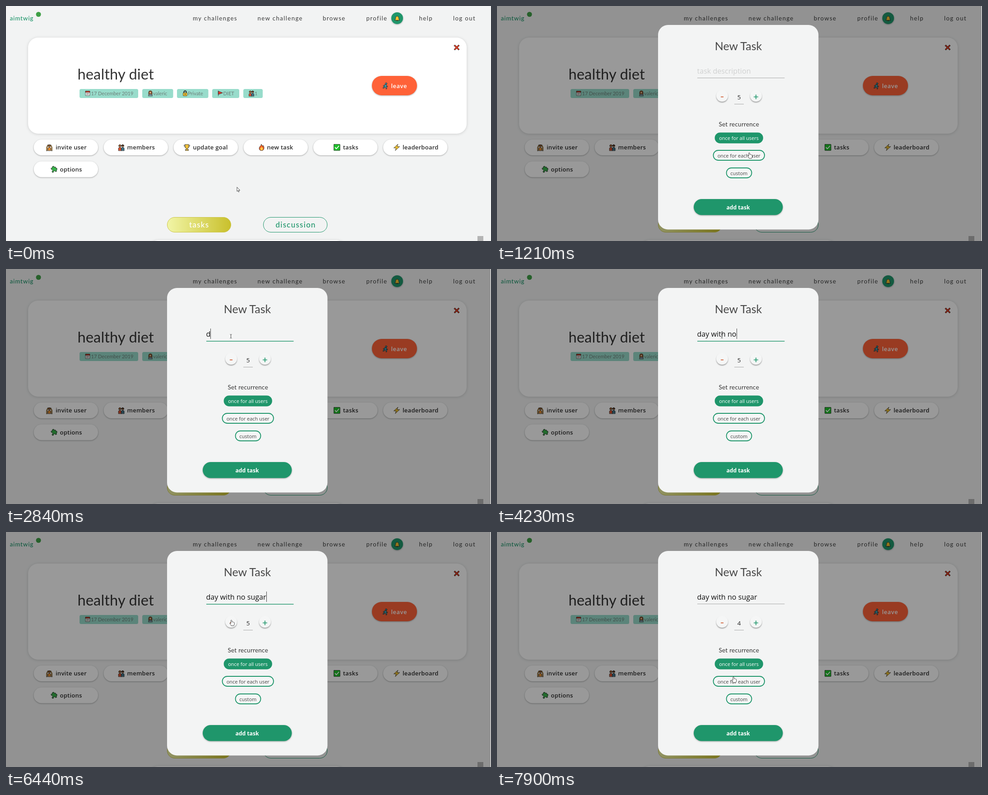
An HTML page that plays this animation: 1075 px wide and 521 px high, repeating every 8000 ms.

```html
<!DOCTYPE html>
<html lang="en">
<head>
<meta charset="utf-8">
<title>New task</title>
<style>
  html, body { margin: 0; width: 100%; height: 100%; overflow: hidden; background: #f2f3f3; }
  svg { display: block; width: 1075px; height: 521px; }
  text { white-space: pre; }
  .round { font-family: Lato, "Open Sans", sans-serif; }
  .plain { font-family: "Open Sans", "Noto Sans", sans-serif; }
  .nav { font-size: 13.3px; letter-spacing: 1.35px; fill: #3c3c3c; }
  .badge { font-size: 11px; fill: #6c7f79; }
  .menu { font-size: 13px; letter-spacing: .25px; font-weight: 600; fill: #2b2b2b; }
  .tab { font-size: 17px; letter-spacing: 1.25px; font-weight: 500; }
  .pill { font-size: 11px; fill: #444; }
  .input { font-size: 16.1px; fill: #111; }
  .low { filter: drop-shadow(0 1.5px 1.5px rgba(0,0,0,.32)); }
  .knob { filter: drop-shadow(0 2px 1px rgba(0,0,0,.34)); }
  .wide { filter: drop-shadow(0 1px 3px rgba(0,0,0,.15)); }
  .ink { stroke: #222; stroke-width: .8; stroke-linejoin: round; stroke-linecap: round; }
</style>
</head>
<body>
<svg id="stage" viewBox="0 0 1075 521" xmlns="http://www.w3.org/2000/svg"></svg>
<script>
const GREEN = '#1f966b';
const stage = document.getElementById('stage');

const text = (x, y, cls, str, extra = '') =>
  `<text x="${x}" y="${y}" class="${cls}" ${extra}>${str}</text>`;
const rect = (x, y, w, h, r, fill, extra = '') =>
  `<rect x="${x}" y="${y}" width="${w}" height="${h}" rx="${r}" fill="${fill}" ${extra}/>`;
const circle = (x, y, r, fill, extra = '') =>
  `<circle cx="${x}" cy="${y}" r="${r}" fill="${fill}" ${extra}/>`;
const path = (d, fill, extra = '') => `<path d="${d}" fill="${fill}" ${extra}/>`;
const group = (id, body) => `<g id="${id}">${body}</g>`;

const person = (x, hair, shirt) =>
  path(`M${x - 3.3} 7V1.5Q${x} -2 ${x + 3.3} 1.5V7Z`, shirt) +
  circle(x, -3.5, 2.6, '#e0a070') +
  path(`M${x - 2.6} -3.5a2.6 2.6 0 0 1 5.2 0Z`, hair);

// Every icon is drawn around its own centre, about 14 px across.
const icons = {
  calendar: rect(-5.5, -5.5, 11, 11.5, .5, '#fff') + rect(-5.5, -5.5, 11, 3.2, .5, '#d9432f') +
    text(0, 4.2, 'plain', '31', 'font-size="6.5" font-weight="700" text-anchor="middle" fill="#333" stroke="none"'),
  woman: path('M-4.5 3V-2a4.5 4.5 0 0 1 9 0V3Z', '#a5622f') + circle(0, -1.5, 2.7, '#f0b987') +
    path('M-5 6.5Q-5 2 0 2T5 6.5Z', '#7f9aa8'),
  lock: path('M-3 -1V-3a3 3 0 0 1 6 0V-1', 'none', 'stroke-width="2"') + rect(-5, -1.5, 10, 8, 1, '#f2c230') +
    path('M0 1.5V3.5', 'none', 'stroke-width="1.6"'),
  flag: path('M-5 -5.5L6 -1L-5 3Z', '#e23a2c') + path('M-5 -6V6.5', 'none'),
  couple: person(-3, '#c8702f', '#d8512f') + person(3.2, '#5b3a22', '#3d7286'),
  cheer: person(0, '#a3602c', '#df8b32') +
    path('M-5.5 7V0L-3 -5M5.5 7V0L3 -5', 'none', 'style="stroke-width:2.4"') +
    path('M-5.5 6.5V0L-3 -4.5M5.5 6.5V0L3 -4.5', 'none', 'style="stroke:#e2a13c;stroke-width:1.2"'),
  runner: circle(1.6, -5, 1.9, '#39a5b8') +
    path('M-1.8 -2.6L2 -2.8L2.6 0L5 .8L4.6 2L1.6 1.4L3.4 4.2L2.6 7H1L1.4 4.6L-1 2.4L-2.2 4.8L-5.5 5.4L-5.6 4L-3.4 3.2L-1.6 -.8L-3.4 1.4L-4.8 .6Z', '#39a5b8'),
  bell: path('M-5 4Q-3.6 2.5 -3.6 -.5Q-3.6 -4.6 0 -5Q3.6 -4.6 3.6 -.5Q3.6 2.5 5 4Z', '#f5c432') +
    path('M-1.3 4.5a1.3 1.3 0 0 0 2.6 0Z', '#d89a20'),
  cross: path('M-6 -4L-4 -6L0 -2L4 -6L6 -4L2 0L6 4L4 6L0 2L-4 6L-6 4L-2 0Z', '#e33a20'),
  trophy: path('M-4 -5H-6.5Q-6.5 -.5 -3 0M4 -5H6.5Q6.5 -.5 3 0', 'none') +
    path('M-4 -6.5H4V-2Q4 2 1 2.5V4.5H3.5V6.8H-3.5V4.5H-1V2.5Q-4 2 -4 -2Z', '#f2c23a'),
  fire: path('M-.8 -7Q1.5 -4.5 2.6 -2.2Q3.6 -3 3.4 -4.6Q6.2 -1 5.4 2.5Q4.2 7 0 7Q-4.8 7 -5.4 2.4Q-5.5 -.5 -3 -2.8Q-.6 -4.6 -.8 -7Z', '#ee6329') +
    path('M0 -1Q3 1.2 2.8 3.6Q2.4 6.4 0 6.4T-2.8 3.6Q-2.2 1.2 0 -1Z', '#ffd04a', 'stroke="none"'),
  check: rect(-6.8, -6.8, 13.6, 13.6, .5, '#1fc12b') +
    path('M-4 .2L-1.2 3L4.2 -3', 'none', 'style="stroke:#fff;stroke-width:1.8"'),
  bolt: path('M2.5 -7L-6.5 1.2H-1.2L-3.2 7L6.5 -1.8H1Z', '#f8c731'),
  puzzle: `<g transform="rotate(-15)">${path('M-5 -4H-2Q-3 -7 0 -7T2 -4H5V-1Q7.4 -2 7.2 .8T5 2.6V6H2Q2.4 3.4 0 3.5T-2 6H-5V3Q-2.6 3.2 -2.8 1T-5 -1Z', '#38b34a')}</g>`
};
const icon = (name, x, y, scale = 1) =>
  `<g class="ink" transform="translate(${x} ${y}) scale(${scale})">${icons[name]}</g>`;

function page() {
  const nav = [[414, 'my challenges'], [557.5, 'new challenge'], [702, 'browse'],
    [798.5, 'profile'], [915.5, 'help'], [991, 'log out']];
  const badges = [[163, 130, 'calendar', '17 December 2019', 188.5], [302, 68.5, 'woman', 'valeric', 326],
    [379, 69.5, 'lock', 'Private', 403], [457, 60, 'flag', 'DIET', 481.5], [526, 43, 'couple', '1', 551]];
  const menu = [[61.5, 'cheer', 96, 'invite user', 110], [216.5, 'couple', 255.5, 'members', 268.5],
    [371.5, 'trophy', 401, 'update goal', 414.5], [526.5, 'fire', 566.5, 'new task', 578.5],
    [681, 'check', 733.5, 'tasks', 747], [836, 'bolt', 866, 'leaderboard', 879],
    [61.5, 'puzzle', 106, 'options', 119.5]];
  return rect(0, 0, 1075, 521, 0, '#f2f3f3') +
    text(8.5, 32, 'round', 'aimtwig', `font-size="13.5" letter-spacing=".8" font-weight="500" fill="${GREEN}"`) +
    circle(72, 18.5, 5.5, '#3f9f46') +
    nav.map(([x, s]) => text(x, 32, 'round nav', s)).join('') +
    circle(867, 27, 13, GREEN, 'class="low"') + icon('bell', 867, 27.5) +
    rect(49, 70, 972, 213, 22, '#fff', 'class="wide"') +
    icon('cross', 999, 92) +
    text(158.5, 162.5, 'round', 'healthy diet', 'font-size="32.5" letter-spacing=".15" fill="#333"') +
    badges.map(([x, w, name, s, tx], i) => rect(x, 184, w, 20, 3.5, '#98dccb') +
      icon(name, x + 18, 193.5, .88) + text(tx, 197.5, 'round badge', s)).join('') +
    rect(811, 155, 100, 43, 21.5, '#ff6238', 'class="low"') + icon('runner', 841, 177) +
    text(853.5, 182, 'plain', 'leave', 'font-size="13" letter-spacing=".45" font-weight="600" fill="#fff"') +
    menu.map(([x, name, ix, s, tx], i) => {
      const y = i === 6 ? 344.5 : 296;
      return rect(x, y, 142.5, 35, 17.5, '#fff', 'class="low"') +
        icon(name, ix, y + 17.5) + text(tx, y + 22, 'plain menu', s);
    }).join('') +
    rect(357.5, 468.5, 141, 33, 16.5, 'url(#lime)', 'stroke="#cbc548"') +
    text(406, 491, 'round tab', 'tasks', 'fill="#fff"') +
    rect(570.5, 468.5, 141.5, 33, 16.5, 'none', `stroke="${GREEN}"`) +
    text(597.5, 491, 'round tab', 'discussion', `fill="${GREEN}"`) +
    rect(318, 519, 434, 40, 20, '#fff', 'class="wide"') +
    rect(1045, 510, 13, 13, 0, '#b4b4b4');
}

function modal() {
  const pill = (x, y, w, s, tx, on) =>
    rect(x + 1, y + 1, w - 2, 22, 11, on ? GREEN : '#f5f6f6', `stroke="${GREEN}" stroke-width="1.8"`) +
    text(tx, y + 16.5, 'plain pill', s, on ? 'style="fill:#fff"' : '');
  const knob = (x, s, color) => circle(x, 199, 13, '#f5f6f6', 'class="knob"') +
    path(s, 'none', `stroke="${color}" stroke-width="1.7"`);
  return rect(0, 0, 1074, 521, 0, '#000', 'opacity=".4"') +
    rect(357, 42, 355.5, 453.5, 22, '#f3f4f4') +
    text(535, 97.5, 'round', 'New Task', 'font-size="25" text-anchor="middle" fill="#484848"') +
    `<rect id="line" x="444" width="193.5"/>` +
    text(443.5, 150, 'plain input', '', 'id="field"') +
    `<rect id="caret" y="132" width="1" height="23" fill="#444"/>` +
    knob(499, 'M496 201.5H502', '#cf5a30') + knob(574, 'M569 201.5H579M574 196.5V206.5', GREEN) +
    text(536.5, 207, 'plain', '5', 'id="count" font-size="13.5" text-anchor="middle" fill="#222"') +
    rect(526, 217, 21, 1, 0, '#a8a8a8') +
    text(491.5, 267, 'round', 'Set recurrence', 'font-size="13.5" letter-spacing=".25" fill="#333"') +
    pill(482.5, 280.5, 107.5, 'once for all users', 492.2, true) +
    pill(478.5, 319, 115.5, 'once for each user', 488.7) +
    pill(507.5, 358, 58, 'custom', 517.3) +
    rect(436, 428, 197.5, 35.5, 17.75, GREEN, 'class="low"') +
    text(534.5, 450.5, 'plain', 'add task', 'font-size="12.2" font-weight="700" text-anchor="middle" fill="#fff"');
}

// Pointers have their hot spot at 0,0.
const pointers = {
  arrow: path('M0 0V9L2 7.2L3.4 10.4L4.9 9.7L3.5 6.6H6.2Z', '#fff', 'class="ink"'),
  hand: path('M-1.2 1Q0 -1 1.2 1V4.2Q2.4 3.4 3.2 4.6Q4.4 4 5 5.2Q6.6 4.8 6.6 6.6V9Q6.6 10.6 5.4 12.8H-.2Q-1 10.6 -3.4 8Q-3.8 6.2 -1.2 7.2Z', '#fff', 'class="ink"'),
  beam: path('M-2 -4H-.6L0 -3.4L.6 -4H2M-2 4.2H-.6L0 3.6L.6 4.2H2M0 -3.4V3.6', 'none', 'stroke="#333" stroke-width=".9"')
};

stage.innerHTML =
  `<defs><linearGradient id="lime"><stop stop-color="#f1f5a6"/><stop offset="1" stop-color="#c9c02c"/></linearGradient></defs>` +
  page() + group('modal', modal()) +
  circle(559, 324.5, 7.5, '#f8f03c', 'id="click" opacity=".7"') +
  Object.entries(pointers).map(([k, body]) => group(k, body)).join('');

const $ = id => document.getElementById(id);
const LOOP = 8000;

// Each step changes only the named parts of the state.
const steps = [
  [0, { ptr: 'arrow', x: 512, y: 402, click: 0, open: 0, typed: '', caret: 0, focus: 0, count: 5 }],
  [200, { x: 514, y: 397 }],
  [400, { x: 528, y: 373 }],
  [600, { x: 547, y: 342 }],
  [790, { ptr: 'hand', x: 559, y: 325 }],
  [990, { click: 1 }],
  [1210, { click: 0, open: 1 }],
  [1390, { x: 553, y: 313 }],
  [1600, { ptr: 'arrow', x: 529, y: 240 }],
  [1810, { x: 507, y: 174 }],
  [2010, { ptr: 'beam', x: 498.5, y: 149 }],
  [2220, { focus: 1, caret: 1 }],
  [2640, { caret: 0 }],
  [2840, { typed: 'd', caret: 1 }],
  [3050, { typed: 'da' }],
  [3250, { typed: 'day ' }],
  [3450, { typed: 'day w' }],
  [3650, { typed: 'day wit' }],
  [3850, { typed: 'day with' }],
  [4040, { typed: 'day with n' }],
  [4230, { typed: 'day with no' }],
  [4460, { typed: 'day with no s' }],
  [4650, { typed: 'day with no su' }],
  [4850, { typed: 'day with no suga' }],
  [5030, { typed: 'day with no sugar' }],
  [5470, { caret: 0 }],
  [6030, { caret: 1, y: 152 }],
  [6240, { ptr: 'arrow', x: 499, y: 174 }],
  [6440, { ptr: 'hand', x: 499.5, y: 195 }],
  [6680, { focus: 0, caret: 0 }],
  [6880, { count: 4 }],
  [7310, { x: 503, y: 211 }],
  [7510, { x: 512, y: 258 }],
  [7710, { x: 521, y: 304 }],
  [7900, { x: 524, y: 321 }]
];

const show = (el, on) => el.setAttribute('visibility', on ? 'visible' : 'hidden');
const set = (el, attrs) => { for (const k in attrs) el.setAttribute(k, attrs[k]); };

function render(s) {
  $('modal').style.display = s.open ? '' : 'none';
  show($('click'), s.click);
  for (const k in pointers) show($(k), k === s.ptr);
  set($(s.ptr), { transform: `translate(${s.x} ${s.y})` });
  $('field').textContent = s.typed || 'task description';
  $('field').style.fill = s.typed ? '' : '#d0d1d1';
  $('count').textContent = s.count;
  const width = s.typed ? $('field').getComputedTextLength() : 0;
  set($('caret'), { x: Math.round(443.5 + width) });
  $('caret').style.display = s.caret ? '' : 'none';
  set($('line'), s.focus ? { y: 159.4, height: 1.4, fill: GREEN } : { y: 159, height: 1, fill: '#a8a8a8' });
}

const start = performance.now();
let shown = 0;

function tick() {
  const t = (performance.now() - start) % LOOP;
  const n = steps.filter(s => s[0] <= t).length;
  if (n !== shown) {
    shown = n;
    render(Object.assign({}, ...steps.slice(0, n).map(s => s[1])));
  }
  requestAnimationFrame(tick);
}
tick();
</script>
</body>
</html>
```
